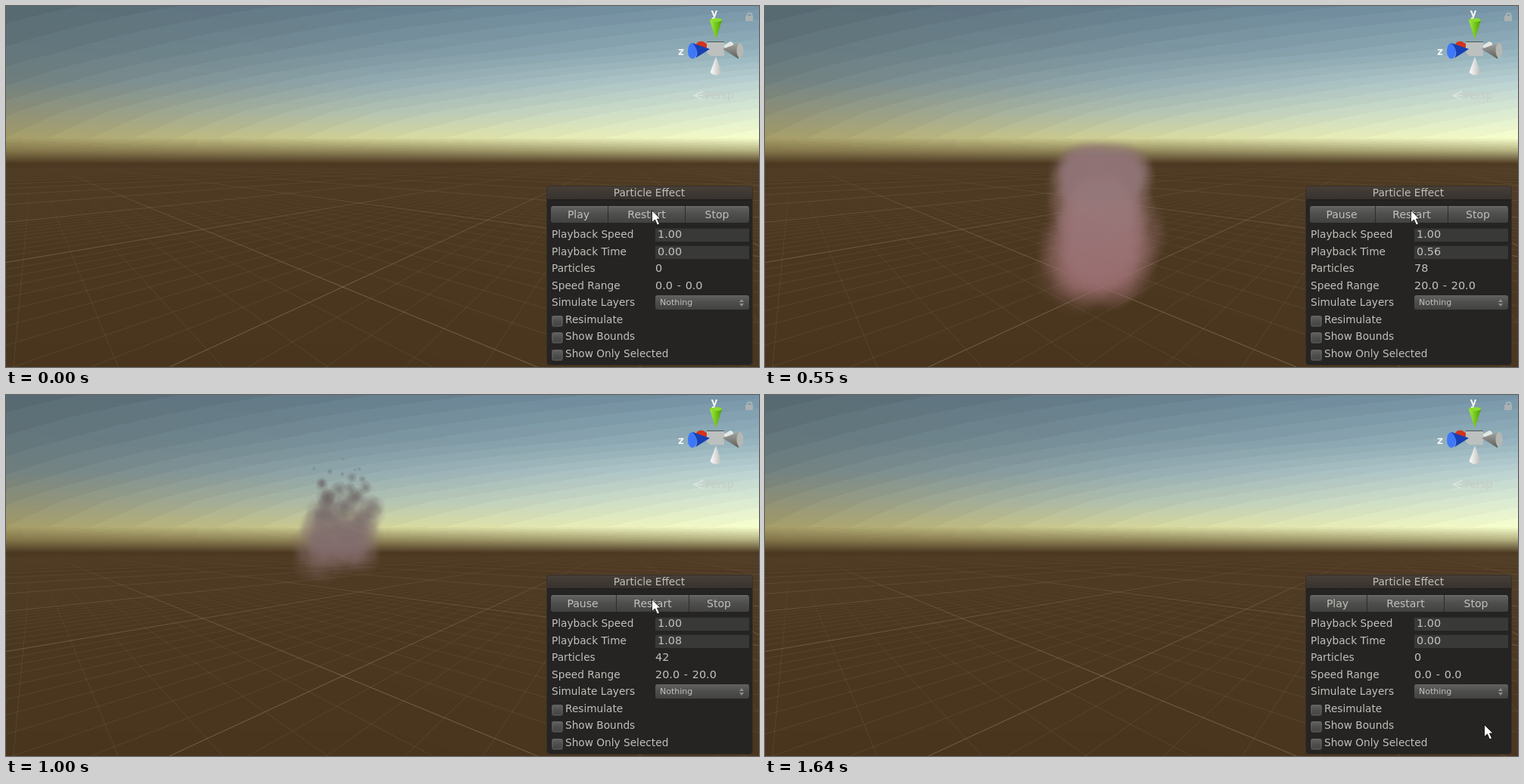
These frames come from a looping animation (995x478 px, 1.68 s). An HTML page with a canvas:

```html
<!DOCTYPE html>
<html lang="en">
<head>
<meta charset="utf-8">
<title>Particle preview</title>
<style>
html, body { margin: 0; width: 100%; height: 100%; overflow: hidden; background: #4c3620; }
canvas, svg { position: absolute; left: 0; top: 0; width: 995px; height: 478px; }
text { font-family: "DejaVu Sans", sans-serif; font-size: 13.7px; fill: #c0c0bc; }
.num { font-size: 14.4px; word-spacing: 1.2px; }
.mid { text-anchor: middle; }
.btn { font-size: 14px; }
</style>
</head>
<body>
<canvas id="scene" width="995" height="478"></canvas>
<svg viewBox="0 0 995 478">
  <defs>
    <linearGradient id="face" x2="0" y2="1">
      <stop stop-color="#626260"/><stop offset=".5" stop-color="#4e4e4c"/><stop offset="1" stop-color="#424240"/>
    </linearGradient>
    <linearGradient id="head" x2="0" y2="1">
      <stop stop-color="#473f38"/><stop offset="1" stop-color="#37322e"/>
    </linearGradient>
    <linearGradient id="green"><stop stop-color="#a2f03a"/><stop offset="1" stop-color="#4b9c08"/></linearGradient>
    <linearGradient id="pale"><stop stop-color="#fff"/><stop offset="1" stop-color="#b9bab6"/></linearGradient>
    <linearGradient id="grey" x2="0" y2="1"><stop stop-color="#a5a6a2"/><stop offset="1" stop-color="#5b5c58"/></linearGradient>
  </defs>

  <g id="gizmo">
    <path d="M912 51Q914 46 921 47L930 53 920 58Z" fill="#d7331a"/>
    <path d="M947 53L957 47Q962 48 961 53L952 57Z" fill="#e4e8e4"/>
    <path d="M926 48H949V66H931L926 62Z" fill="#bcc1bf"/>
    <path d="M926 47.5H949" stroke="#4d5656"/>
    <path d="M930 19L938 44 946 19Z" fill="url(#green)"/>
    <ellipse cx="938" cy="18.5" rx="8" ry="2.5" fill="#8bdc2c"/>
    <path d="M938 67L930.5 88Q938 95 945.5 88Z" fill="url(#pale)"/>
    <ellipse cx="907" cy="59.5" rx="6" ry="10.5" fill="#3e78f8"/>
    <path d="M907 49L930 57 911 69Q917 60 907 49Z" fill="#1740b4"/>
    <path d="M947 57L968 49V70Z" fill="url(#grey)"/>
    <ellipse cx="970" cy="59" rx="4.5" ry="10" fill="#b4b7b2"/>
    <g style="font-weight:bold">
      <text class="mid" x="936" y="14" style="fill:#f2f4f4">y</text>
      <text class="mid" x="892" y="65" style="fill:#f2f4f4">z</text>
    </g>
    <path d="M979.5 14V12Q979.5 9.5 982.5 9.5T985.5 12V14" fill="none" stroke="#b0b7b9" stroke-width="1.5"/>
    <rect x="977" y="13" width="10" height="7" fill="#aab1b3"/>
    <path d="M921 113L909 118.5 921 124M909 118.5H921" fill="none" stroke="#dce2dc" stroke-width="1.5"/>
    <text x="924" y="123" style="fill:#c6cbc5">Persp</text>
  </g>

  <g id="panel">
    <rect x="714.5" y="238.5" width="272" height="237" rx="4" fill="#252422" stroke="#37302a"/>
    <path d="M715 256V242Q715 239 718 239H983Q986 239 986 242V256Z" fill="url(#head)"/>
    <path d="M715 256.5H986" stroke="#1d1b1a"/>
    <text class="mid" x="850" y="252">Particle Effect</text>
    <rect x="720" y="265" width="262" height="22" rx="3" fill="url(#face)"/>
    <path d="M722 265.5H980" stroke="#737371"/>
    <g id="buttons"></g>
    <g id="rows"></g>
    <path d="M858 294H982V312H858ZM858 317H982V335H858Z" fill="#393937"/>
    <path d="M858 294.5H982M858 317.5H982" stroke="#2a2a29"/>
    <rect x="858" y="383" width="124" height="19" rx="3" fill="url(#face)"/>
    <text x="864" y="396" style="font-size:11px">Nothing</text>
    <path d="M969 392L972 388 975 392ZM969 394L972 398 975 394Z" fill="#8d8d8a"/>
    <text class="num" x="861" y="307">1.00</text>
    <text class="num" x="861" y="330" id="time"></text>
    <text class="num" x="858" y="352" id="count"></text>
    <text class="num" x="858" y="375" id="speed"></text>
  </g>
  <path id="cursor" d="M0 0V16L4 12.5 7 19.5 10 18 7 11.5H11.5Z" fill="#fff" stroke="#111" stroke-width=".9"/>
</svg>

<script>
const W = 995, H = 478, LOOP = 1680;
const $ = id => document.getElementById(id);
const clamp = v => Math.max(0, Math.min(1, v));
const lerp = (a, b, k) => a + (b - a) * k;
const mix = (a, b, k) => a.map((v, i) => lerp(v, b[i], k));
const ctx = $('scene').getContext('2d');

// ---- Panel ----
const checkBox = y => `<rect x="721" y="${y}" width="15" height="15" rx="3" fill="url(#face)"/>
  <rect x="722.5" y="${y + 1.5}" width="12" height="12" rx="2" fill="none" stroke="#6b6b69" stroke-opacity=".5"/>`;

$('rows').innerHTML = ['Playback Speed', 'Playback Time', 'Particles', 'Speed Range',
  'Simulate Layers', 'Resimulate', 'Show Bounds', 'Show Only Selected'].map((s, i) => {
  const y = Math.round(307 + i * 22.57), check = i > 4;
  return (check ? checkBox(y - 10) : '') + `<text x="${check ? 739 : 721}" y="${y}">${s}</text>`;
}).join('');

function buttonRow(first, a, b) {
  const edges = [720, a, b, 982];
  return [first, 'Restart', 'Stop'].map((s, i) => {
    const x = edges[i], mid = (x + edges[i + 1]) / 2;
    return (i ? `<path d="M${x - .5} 265V287" stroke="#2c2c2b"/>` : '') +
      `<text class="mid btn" x="${mid - (i ? .5 : 1.5)}" y="281">${s}</text>`;
  }).join('');
}
const buttons = { idle: buttonRow('Play', 796, 898), live: buttonRow('Pause', 807, 903) };

// ---- Backdrop ----
const rowY = [0, 60, 100, 140, 174, 191, 208];
const sky = [
  [[86, 104, 112], [98, 117, 122], [112, 127, 126], [141, 143, 117], [164, 156, 103], [132, 118, 74], [77, 57, 34]],
  [[102, 127, 142], [124, 149, 160], [147, 171, 177], [179, 195, 178], [212, 214, 156], [148, 138, 93], [77, 57, 34]],
  [[118, 149, 168], [149, 179, 190], [187, 210, 210], [219, 235, 211], [247, 255, 206], [180, 178, 128], [79, 59, 36]]
];

function paintSky(c) {
  const img = c.createImageData(W, H);
  for (let y = 0; y < H; y++) {
    let r = 0;
    while (r < 5 && y >= rowY[r + 1]) r++;
    const k = clamp((y - rowY[r]) / (rowY[r + 1] - rowY[r]));
    const [left, mid, right] = sky.map(s => mix(s[r], s[r + 1], k));
    const depth = clamp((y - 208) / 270) * 4;
    for (let x = 0; x < W; x++) {
      const h = x / W * 2;
      const p = h < 1 ? mix(left, mid, h) : mix(mid, right, h - 1);
      const lum = (p[0] + p[1] + p[2]) / 3;
      const band = y < 188 ? Math.round(lum / 6) * 6 / lum : 1;
      const o = (y * W + x) * 4;
      for (let i = 0; i < 3; i++) img.data[o + i] = p[i] * band - depth;
      img.data[o + 3] = 255;
    }
  }
  c.putImageData(img, 0, 0);
}

// Ground plane: both line families run to vanishing points on the horizon.
const A = .822, B = 1.098, HORIZON = 203;
function ground(u, v) {
  const w = 1 + A * u + B * v;
  return [(445 + A * u * 35 + B * v * 810) / w, (372 + (w - 1) * HORIZON) / w];
}
function paintGrid(c, step, from, to, top, alpha) {
  const fade = c.createLinearGradient(0, top, 0, 370);
  fade.addColorStop(0, 'rgba(176,160,128,0)');
  fade.addColorStop(.35, `rgba(176,160,128,${alpha * .55})`);
  fade.addColorStop(1, `rgba(176,160,128,${alpha})`);
  c.strokeStyle = fade;
  c.lineWidth = 1;
  c.beginPath();
  for (let i = Math.round(from / step); i <= to / step; i++) {
    if (step < 1 && i % 10 === 0) continue;
    const s = i * step;
    const uEnd = w => (w - 1 - B * s) / A, vEnd = w => (w - 1 - A * s) / B;
    c.moveTo(...ground(s, vEnd(.5))); c.lineTo(...ground(s, vEnd(16)));
    c.moveTo(...ground(uEnd(.5), s)); c.lineTo(...ground(uEnd(16), s));
  }
  c.stroke();
}

const backdrop = document.createElement('canvas');
backdrop.width = W;
backdrop.height = H;
const bg = backdrop.getContext('2d');
paintSky(bg);
paintGrid(bg, 1, -4, 17, 209, .4);
paintGrid(bg, .1, -2.5, 5, 232, .13);

// ---- Particles: a burst, then a steady stream for half a second ----
let seed = 11;
const rnd = () => (seed = seed * 16807 % 2147483647) / 2147483647;
const LIFE = 1.0099;
const puffs = Array.from({ length: 78 }, (_, i) => {
  const a = i * 2.4, d = Math.pow(rnd(), .35);
  return {
    born: i < 29 ? 0 : (i - 28) / 100,
    x: Math.cos(a) * d * 40, y: Math.sin(a) * d * 8,
    size: .9 + rnd() * .2, spin: rnd() * 6.28
  };
}).reverse();
const tint = a => a < .5
  ? mix([157, 107, 109], [154, 122, 124], a / .5)
  : mix([154, 122, 124], [92, 88, 90], clamp((a - .5) / .45));

function blob(x, y, r, rgb, alpha) {
  const g = ctx.createRadialGradient(x, y, 0, x, y, r);
  const stop = (o, k) => g.addColorStop(o, `rgba(${rgb},${alpha * k})`);
  stop(0, 1); stop(.6, .9); stop(.82, .4); stop(1, 0);
  ctx.fillStyle = g;
  ctx.fillRect(x - r, y - r, r * 2, r * 2);
}
function drawPuff(p, age) {
  const r = 54 * (1 - Math.pow(Math.min(age, .97), 1.9)) * Math.min(1, .4 + age * 5) * p.size;
  const rgb = tint(age).map(Math.round);
  const alpha = (.12 + .08 * age) * Math.min(1, .2 + age * 7) * clamp((1.05 - age) * 6);
  const x = 445 + p.x, y = 384 - 290 * age + p.y;
  for (let i = 0; i < 4; i++) {
    const a = p.spin + i * 1.6 + age;
    blob(x + Math.cos(a) * r * .32, y + Math.sin(a) * r * .32, r * .74, rgb, alpha);
  }
}

// ---- Clock: start ms, held steps until the next row, playback seconds ----
const beats = [
  [0, 1, 0], [130, 2, .06], [220, 5, .16], [420, 6, .43], [670, 4, .7],
  [830, 8, .88], [1170, 1, 1.29], [1210, 10, 1.34], [1640, 1, 1.86], [LOOP, 1, 1.91]
];
function clock(ms) {
  const i = beats.findIndex((b, n) => ms < beats[n + 1][0]);
  const [start, n, from] = beats[i], [end, , to] = beats[i + 1];
  const k = Math.floor((ms - start) / (end - start) * n + 1e-6) / n;
  return { key: i + k, at: lerp(start, end, k), play: i ? lerp(from, to, k) : 0 };
}

let shown = -1, mode = '';
function render(now) {
  requestAnimationFrame(render);
  const { key, at, play } = clock(now % LOOP);
  if (key === shown) return;
  shown = key;

  ctx.drawImage(backdrop, 0, 0);
  const alive = play > 0
    ? puffs.filter(p => play - p.born > -1e-6 && play - p.born < LIFE) : [];
  alive.forEach(p => drawPuff(p, Math.max(0, play - p.born)));

  const live = alive.length > 0, next = live ? 'live' : 'idle';
  if (next !== mode) $('buttons').innerHTML = buttons[mode = next];
  $('time').textContent = (live ? play : 0).toFixed(2);
  $('count').textContent = alive.length;
  $('speed').textContent = live ? '20.0 - 20.0' : '0.0 - 0.0';

  const m = clamp((at - 1340) / 300), e = m * m * (3 - 2 * m);
  $('cursor').setAttribute('transform', `translate(${lerp(853.5, 950.5, e)} ${lerp(270.5, 436.5, e)})`);
}
requestAnimationFrame(render);
</script>
</body>
</html>
```
